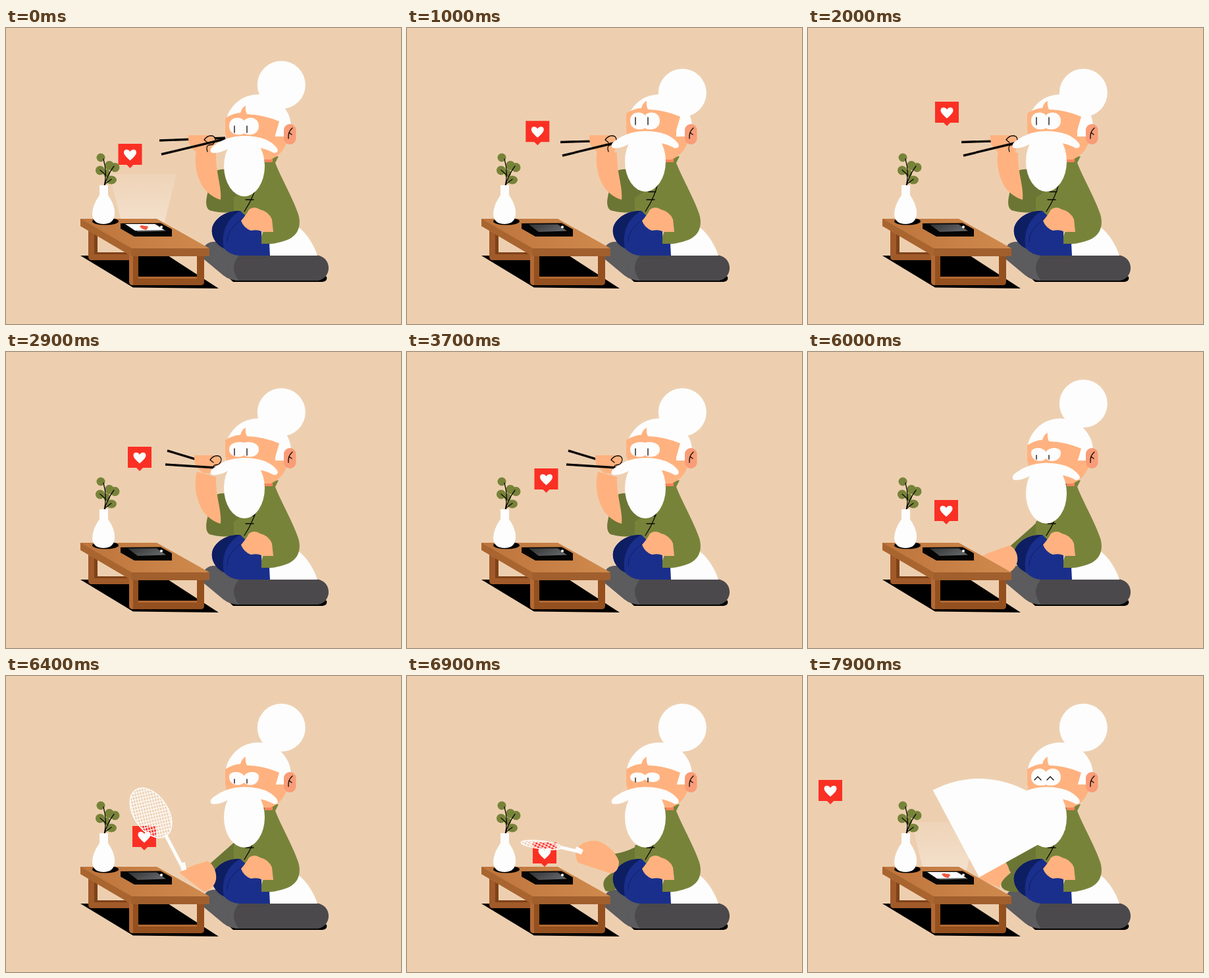
Animation of 600 by 450 pixels, one loop 8000 ms. Source, as an HTML page:

```html
<!DOCTYPE html>
<html lang="en">
<head>
<meta charset="utf-8">
<title>Tea table</title>
<style>
html, body { margin: 0; width: 100%; height: 100%; overflow: hidden; background: #edcfb0; }
svg { display: block; width: 100%; height: 100%; }
.ink { fill: none; stroke: #0b0806; stroke-width: 1.3; stroke-linecap: round; stroke-linejoin: round; }
.stick { fill: none; stroke: #0b0806; stroke-width: 3.4; }
.white { fill: #fdfdfd; }
.skin { fill: #ffb27f; }
.olive { fill: #78833a; }
</style>
</head>
<body>
<svg viewBox="0 0 600 450">
  <defs>
    <linearGradient id="glow" x2="0" y2="1">
      <stop stop-color="#fff" stop-opacity=".1"/>
      <stop offset="1" stop-color="#fff" stop-opacity=".36"/>
    </linearGradient>
    <linearGradient id="glass" x2="1" y2=".4">
      <stop stop-color="#303234"/><stop offset="1" stop-color="#626466"/>
    </linearGradient>
    <linearGradient id="wood">
      <stop stop-color="#bd743c"/><stop offset="1" stop-color="#d08a4d"/>
    </linearGradient>
    <pattern id="net" width="5" height="4" patternUnits="userSpaceOnUse" patternTransform="rotate(20)">
      <path d="M0 0H5M0 0V4" stroke="#fff" stroke-width="2.4"/>
    </pattern>
  </defs>
  <rect width="600" height="450" fill="#edcfb0"/>

  <!-- cushion -->
  <path d="M306 350L345 386H478Q489 386 487 378L400 350Z"/>
  <path d="M314 325H402L470 346L490 364Q488 384 470 384H354Q340 384 330 376L300 351Q296 327 314 325Z" fill="#5c5b5d"/>
  <rect x="336" y="345.500" width="154" height="38.500" rx="19" fill="#4b494c"/>
  <path d="M354 345.500Q336 346 336 364.500T354 384Q346 374 346 364.500T354 345.500" fill="#5c5b5d"/>

  <!-- body -->
  <path class="white" d="M398 346H473C466 325 452 305 436 298L396 322Z"/>
  <path class="olive" d="M403 196L414 195L409 205C418 228 434 255 444 283C449 300 444 314 430 321C415 327 400 330 388 328C386 318 390 312 392 306L352 284L350 258L345 215Z"/>
  <path id="sleeve" fill="#6b7634"/>
  <path class="olive" d="M346 258L372 240L396 250V300H360L346 284Z"/>
  <path d="M401 346H354Q340 345 331 335C316 328 310 312 314 301C320 286 338 277 356 278L388 308V328H400Z" fill="#1a2f8c"/>
  <path d="M331 335C316 328 310 312 314 301C320 286 338 277 356 278C336 288 326 312 331 335Z" fill="#0e1e62"/>
  <path d="M359 290Q334 308 336 326" fill="none" stroke="#0e1e62"/>
  <path class="skin" d="M357 293Q365 284 369 276Q377 270 386 276Q399 279 404 291L406 310H389Q384 306 372 308Q361 304 357 293Z"/>
  <path class="ink" d="M381 236Q376 258 362 279M367 249h11M364 261h12"/>

  <polygon id="beam" points="176,298 157,222 259,222 240,298" fill="url(#glow)"/>
  <path id="arm" class="skin"/>
  <g id="hand">
    <path id="backStick" class="stick"/>
    <path class="skin" d="M277 163H310Q320 166 318 178L314 192L290 190L284 184Q276 178 277 163Z"/>
    <path id="frontStick" class="stick"/>
    <path class="ink" d="M301 170Q308 161 316 165Q321 170 314 177L308 178Q303 180 306 188M301 170L306 174"/>
  </g>
  <path id="smear" class="white"/>

  <!-- head -->
  <circle id="bun" class="white" cx="418.300" r="36.500"/>
  <path d="M393 196H405V204H393Z" fill="#f9835b"/>
  <path class="white" d="M333 151A50 50 0 0 1 433 151L424 168H333Z"/>
  <path class="skin" d="M333 148H409V165H428Q425 190 402 200H350Q332 185 333 148Z"/>
  <path id="forehead" class="skin" d="M333 137Q346 129 356 129Q358 121 364 118Q363 125 366 131Q392 132 415 142L409 163H333Z"/>
  <rect x="422" y="146" width="18.500" height="31" rx="9" fill="#f99c77"/>
  <path class="ink" d="M435 152Q428 158 429 168M430 159L434 162"/>
  <path id="eyes" class="white"/>
  <path id="pupils" class="ink"/>
  <g id="beard" class="white">
    <ellipse cx="362" cy="210" rx="31" ry="46"/>
    <path d="M311 188Q309 183 317 178Q338 163 362 164Q398 164 412 183Q415 190 407 190Q396 184 384 182H340Q327 190 316 190Q312 190 311 188Z"/>
  </g>

  <!-- table -->
  <path d="M113 346H246L323 396L193 394.500Z"/>
  <path d="M125 300H138V341H187V353H130Q125 353 125 347Z" fill="#a15a29"/>
  <path d="M134 304H139V341H187V344H134Z" fill="#7f4219"/>
  <path fill-rule="evenodd" d="M187 345H301V386Q301 391 296 391H192Q187 391 187 386ZM201 345V378H290V345Z" fill="#94501f"/>
  <path d="M187 345H193V391Q187 390 187 385ZM201 378H290V381H201Z" fill="#b36a35"/>
  <path d="M113 290H229L309 335V347H191L113 301Z" fill="url(#wood)"/>
  <path d="M191 335H309V347H191Z" fill="#a05f2d"/>
  <path d="M113 290L191 335V347L113 301Z" fill="#a9652f"/>
  <ellipse cx="151" cy="294" rx="20" ry="5.500"/>
  <path d="M174 297L235 296.500L252 306V317H195L174 305Z" fill="#050505"/>
  <path d="M185 298.500H229L243 308.500L200 310Z" fill="url(#glass)"/>
  <circle cx="236" cy="302.500" r="2" class="white"/>
  <g id="lit">
    <path d="M181 298H226L240 307L196 308Z" class="white"/>
    <path d="M203 301Q208 299 210 301Q215 300 216 303L213 307Q205 306 203 301Z" fill="#f4573f"/>
  </g>
  <g id="leaves" fill="#78833a"></g>
  <path class="ink" d="M149 241Q154 220 148 199M150 240Q152 226 164 210M152 224L143 216M152 236L160 230"/>
  <path class="white" d="M142 239H155V254Q166 270 165 283Q164 298 148 298Q132 298 131 283Q131 270 142 254Z"/>

  <g id="badge">
    <path d="M-18-16H18V16H5L0 21L-5 16H-18Z" fill="#fb3024"/>
    <path d="M0 9.500C-5 5-9.500 1-9.500-3C-9.500-8-3-9 0-4C3-9 9.500-8 9.500-3C9.500 1 5 5 0 9.500Z" class="white"/>
  </g>
  <g id="swatter">
    <path id="handle" stroke="#fdfdfd" stroke-width="5" fill="none"/>
    <path d="M0 0L-11-3" stroke="#fdfdfd" stroke-width="8"/>
    <ellipse id="paddle" fill="url(#net)" stroke="#fdfdfd" stroke-width="1.500"/>
  </g>
</svg>
<script>
const LOOP = 8000;
const $ = id => document.getElementById(id);
const set = (id, attrs) => { for (const k in attrs) $(id).setAttribute(k, attrs[k]); };
const show = (id, opacity) => set(id, { opacity: +opacity });
const clamp = v => Math.max(0, Math.min(1, v));
const NUM = /-?\d+(\.\d+)?/g;

// Blend two strings that share a structure, number by number.
function mix(a, b, t) {
  const to = b.match(NUM);
  let i = 0;
  return a.replace(NUM, v => +(+v + (to[i++] - v) * t).toFixed(2));
}
const ease = t => t * t * (3 - 2 * t);

// A track is a list of [time, pose] pairs.
function pose(track, t) {
  const i = track.findIndex(k => k[0] > t);
  if (i < 0) return track[track.length - 1][1];
  if (i === 0) return track[0][1];
  const [t0, a] = track[i - 1], [t1, b] = track[i];
  return mix(a, b, ease((t - t0) / (t1 - t0)));
}
const nums = (track, t) => pose(track, t).split(' ').map(Number);

const bunTrack = [[0, '0'], [900, '12'], [2200, '12'], [2800, '5'], [3700, '5'], [4400, '-8']];

const badgeTrack = [[0, '188.5 192 1'], [900, '198 158 1'], [2000, '211 128 1'], [2900, '203 160 1'],
  [3700, '211.5 193 1'], [4400, '203 232 1'], [5000, '208.5 258.5 1'], [6000, '210 241 1'], [6700, '210 246 1'],
  [6900, '209 269 1'], [7050, '209 300 0'], [7450, '209 300 0'], [7700, '205 225 1'], [7790, '200 205 1'], [7900, '34 174 1']];

// side, lid top, bridge, lower lid, lower bridge, pupil top, pupil bottom
const wide = '149 134 141 164 160 149 159', high = '141 126 133 156 152 136 147',
  flat = '148 136 138 161 157 147 157', angry = '153 144 152 168 162 157 163',
  squint = '154 145 151 163 157 155 161', happy = '154 138 146 168 165 153 158';
const eyeTrack = [[0, wide], [900, high], [2200, high], [2800, flat], [3700, flat], [4400, angry],
  [6600, angry], [6850, squint], [7200, squint], [7500, happy]];

const limbTrack = ({ up, down, raised, hit, swing }) => [[0, up], [5100, up], [5400, down], [6350, down],
  [6600, raised], [6750, raised], [6880, hit], [7150, hit], [7400, down], [7700, swing]];
const armTrack = limbTrack({
  up: 'M290 182C284 205 290 228 300 243C308 253 318 259 326 261C328 240 318 220 319 190Z',
  down: 'M262 312C272 305 290 300 306 294C312 296 320 306 318 318C316 330 306 336 300 337Z',
  raised: 'M275 195C272 175 300 165 312 175C322 190 326 215 328 240C322 255 305 258 300 250Z',
  hit: 'M260 284C248 262 268 248 290 251C306 256 318 270 322 282C322 294 316 302 306 299Z',
  swing: 'M258 308C272 298 288 288 300 283C304 288 307 296 306 301C300 306 294 310 291 322Z'
});
const sleeveUp = 'M316 219C330 210 350 215 372 240C380 270 370 280 352 279C335 282 318 280 309 277C300 270 304 255 316 219Z';
const sleeveTrack = limbTrack({
  up: sleeveUp,
  down: 'M340 266C350 256 362 245 378 245C384 262 372 282 350 290C335 310 320 328 302 326C290 318 294 306 306 296Z',
  raised: sleeveUp,
  hit: 'M308 271C325 270 345 264 372 245C384 262 372 282 350 290C335 310 320 330 302 327C296 318 296 308 312 299Z',
  swing: 'M299 284C320 270 340 256 378 245C384 262 372 282 350 290C340 310 325 330 312 328C290 328 286 312 308 299Z'
});

// hand offset, then outer and inner ends of each stick
const pinchSticks = '233 179.5 336 166 238 200.5 336 167';
const reach = '0 0 233 171 336 167 236 192 336 168', low = '0 0 233 173.5 318 171 236 194 314 175',
  lift = '9 -6 236 156 322 182 233 177 326 183', pinch = '0 0 ' + pinchSticks;
const handTrack = [[0, reach], [900, low], [2200, low], [2800, lift], [3700, lift], [4400, pinch],
  [5100, pinch], [5400, '-20 150 ' + pinchSticks]];

// hand x, y, angle, handle length, paddle half length, paddle half height
const swatTrack = [[6350, '268 310 60 60 42 26'], [6600, '290 172 82 66 42 26'], [6750, '290 172 82 66 42 26'],
  [6880, '266 268 13 34 31 6'], [7150, '266 268 13 34 31 6'], [7400, '264 312 8 34 31 6'],
  [7600, '260 306 60 60 42 26'], [7820, '260 306 140 60 42 26']];

$('leaves').innerHTML = [[144, 197, 6.5, 6.5], [143, 216.5, 7, 7], [157, 209, 7, 7], [165.5, 212, 7, 7], [160, 231, 8, 6.5], [153, 221, 5, 6]]
  .map(([x, y, rx, ry]) => `<ellipse cx="${x}" cy="${y}" rx="${rx}" ry="${ry}"/>`).join('');

const polar = (deg, r = 150) => {
  const a = deg * Math.PI / 180;
  return `${260 + r * Math.cos(a)} ${306 + r * Math.sin(a)}`;
};
set('smear', { d: `M260 306L${polar(-118)}A150 150 0 0 1 ${polar(-29)}Z` });

function draw(t) {
  const bun = +pose(bunTrack, t);
  const nod = `translate(0 ${-bun * .6})`;
  set('bun', { cy: 86.5 + bun });
  set('beard', { transform: nod });
  set('forehead', { transform: nod });

  const [side, lid, bridge, low, gap, p0, p1] = nums(eyeTrack, t);
  set('eyes', { d: `M339 ${side}C339 ${lid} 357 ${lid} 361.5 ${bridge}C366 ${lid} 384 ${lid} 384 ${side}C384 ${low} 366 ${low} 361.5 ${gap}C357 ${low} 339 ${low} 339 ${side}Z` });
  const caret = x => `M${x - 5} ${p1}L${x} ${p0}L${x + 5} ${p1}`;
  set('pupils', { d: t > 7350 ? caret(349) + caret(368) : `M347 ${p0}V${p1}M366 ${p0}V${p1}` });

  set('arm', { d: pose(armTrack, t) });
  set('sleeve', { d: pose(sleeveTrack, t) });
  const [hx, hy, ...s] = nums(handTrack, t);
  set('hand', { transform: `translate(${hx} ${hy})` });
  set('backStick', { d: `M${s[0]} ${s[1]}L${s[2]} ${s[3]}` });
  set('frontStick', { d: `M${s[4]} ${s[5]}L${s[6]} ${s[7]}` });
  show('hand', t < 5400);

  const [bx, by, size] = nums(badgeTrack, t);
  set('badge', { transform: `translate(${bx} ${by}) scale(${size})` });
  const light = clamp(t < 4000 ? (800 - t) / 400 : (t - 7400) / 150);
  show('lit', light);
  show('beam', light);

  const [sx, sy, angle, len, rx, ry] = nums(swatTrack, t);
  set('swatter', { transform: `translate(${sx} ${sy}) rotate(${angle})` });
  set('handle', { d: `M0 0H${-len}` });
  set('paddle', { cx: -len - rx + 2, rx, ry, transform: `rotate(-6 ${-len} 0)` });
  show('swatter', (t > 6350 && t < 7350) || (t > 7600 && t < 7850));
  show('smear', t >= 7850);
}

const start = performance.now();
function tick() {
  draw((performance.now() - start) % LOOP);
  requestAnimationFrame(tick);
}
tick();
</script>
</body>
</html>
```
